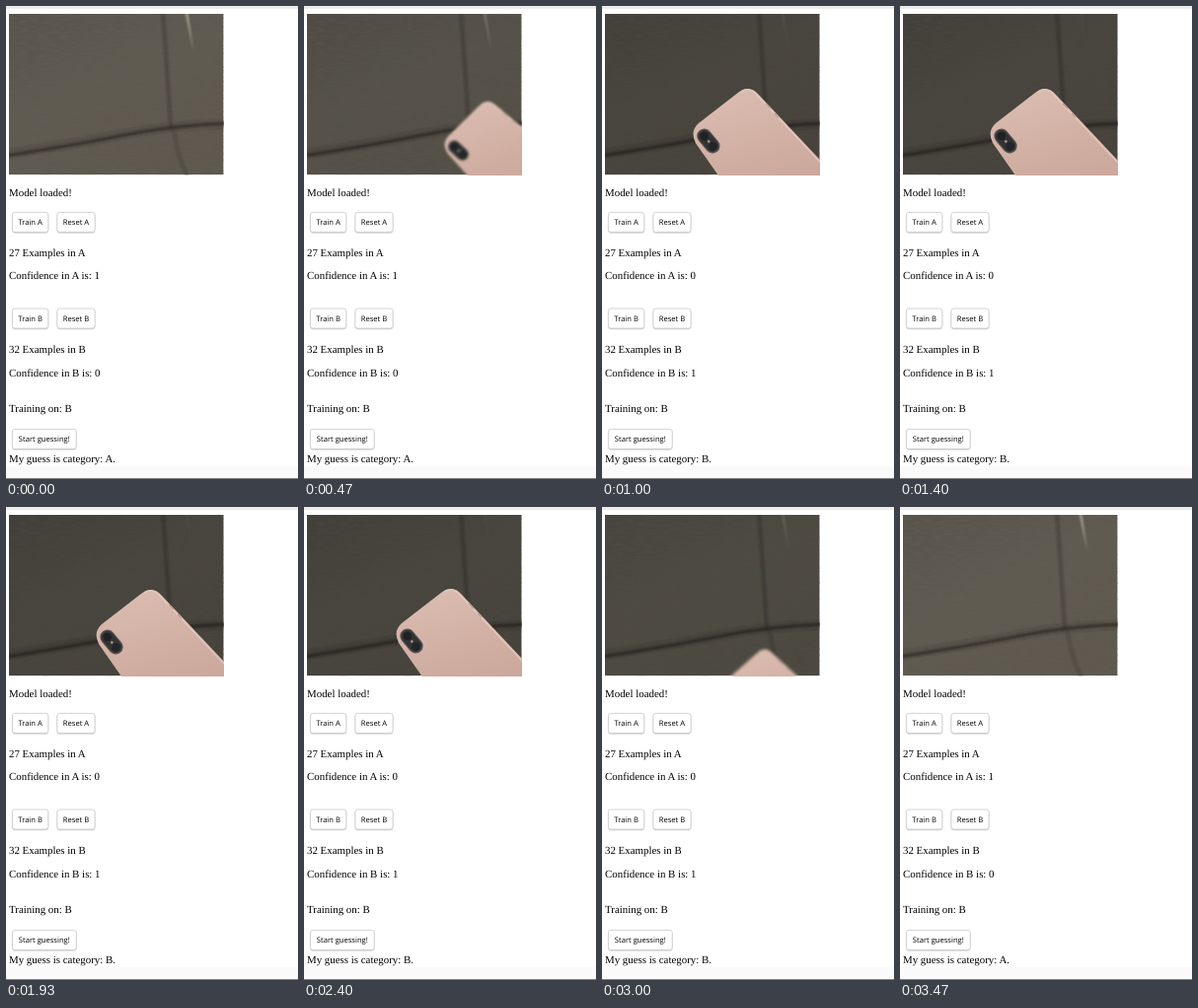
These frames come from a looping animation (296 px wide and 480 px high, 4.07 s). An HTML page:

```html
<!DOCTYPE html>
<html lang="en">
<head>
<meta charset="utf-8">
<title>Webcam classifier</title>
<style>
  html, body { margin: 0; width: 100%; height: 100%; overflow: hidden; background: #fff; }
  #stage { display: block; width: 100vw; height: 100vh; }
  text { font: 10.9px "Liberation Serif", serif; text-rendering: geometricPrecision; }
  .button text { font: 7.6px "Open Sans", sans-serif; text-anchor: middle; }
  .button rect { fill: #fff; stroke: #c9c9c9; stroke-width: .8; }
  .button .shadow { fill: #ccc; stroke: #ddd; }
  .seam { fill: none; stroke: #28241f; stroke-linecap: round; }
</style>
</head>
<body>
<svg id="stage" viewBox="0 0 296 480">
  <defs>
    <linearGradient id="cloth" x2=".6" y2="1">
      <stop offset="0" stop-color="#57534b"/>
      <stop offset=".5" stop-color="#605b51"/>
      <stop offset="1" stop-color="#5e584e"/>
    </linearGradient>
    <linearGradient id="shell" x1=".3" y1="0" x2=".7" y2="1">
      <stop offset="0" stop-color="#dabbb0"/>
      <stop offset=".5" stop-color="#d0ada1"/>
      <stop offset="1" stop-color="#c6a296"/>
    </linearGradient>
    <filter id="weave" x="0" y="0" width="1" height="1">
      <feTurbulence type="fractalNoise" baseFrequency=".09 .6" numOctaves="2" seed="4"/>
      <feColorMatrix values="0 0 0 0 .12  0 0 0 0 .11  0 0 0 0 .09  1.6 0 0 0 -.66"/>
    </filter>
    <filter id="soft" filterUnits="userSpaceOnUse" x="-20" y="-20" width="280" height="230">
      <feGaussianBlur stdDeviation="1.3"/>
    </filter>
  </defs>

  <rect width="296" height="480" fill="#fff"/>
  <rect width="296" height="2" fill="#f1f1f1"/>
  <rect y="1.6" width="296" height=".9" fill="#dcdcdc"/>
  <rect y="467" width="296" height="12" fill="#fafafa"/>
  <rect y="479" width="296" height="1" fill="#858585"/>

  <!-- camera view -->
  <svg x="3" y="8" width="217.6" height="163.2" viewBox="3 8 217.6 163.2">
    <rect x="3" y="8" width="217.6" height="163.2" fill="url(#cloth)"/>
    <rect x="3" y="8" width="217.6" height="163.2" filter="url(#weave)"/>
    <g filter="url(#soft)">
      <path class="seam" stroke-width="9" opacity=".18" d="M0 150Q70 140 120 130T225 120"/>
      <path class="seam" stroke-width="3" opacity=".65" d="M0 152Q70 141 120 131T225 119"/>
      <path class="seam" stroke-width="3.5" opacity=".32" d="M159 5Q163 60 167 123"/>
      <path class="seam" stroke-width="3" opacity=".25" d="M170 126Q173 150 184 174"/>
      <path id="glare" d="M181 4L184 4L190 46Z" fill="#fff4e0"/>
    </g>
    <rect id="dim" x="3" y="8" width="217.6" height="163.2" fill="#050608"/>
    <g id="phone">
      <path fill="url(#shell)" d="M145 212L94 139Q88 127 97 119L137 88Q149 79 158 90L270 209Z"/>
      <path d="M140 87Q149 81 157 91L269 210" fill="none" stroke="#e6cfc5" stroke-width="1.6" opacity=".75"/>
      <path d="M165 99l5 5.300M174 109l4 4.300" stroke="#a98479" stroke-width="1"/>
      <g transform="translate(107 137) rotate(50)">
        <rect x="-14" y="-7.500" width="28" height="15" rx="7.500" fill="#55504e"/>
        <rect x="-12.500" y="-6.200" width="25" height="12.400" rx="6.200" fill="#343334"/>
        <circle cx="-6.500" r="4.300" fill="#202124"/>
        <circle cx="7" r="4.300" fill="#242528"/>
        <circle cx=".5" r="1.300" fill="#a89c94"/>
      </g>
    </g>
  </svg>

  <g id="page"></g>
</svg>
<script>
const FRAME = 1000 / 15, LOOP = 4070;
const $ = id => document.getElementById(id);
const page = $("page");

function line(y, content = "") {
  page.insertAdjacentHTML("beforeend", `<text x="3" y="${y}">${content}</text>`);
  return page.lastElementChild;
}

function button(x, y, width, label) {
  page.insertAdjacentHTML("beforeend", `<g class="button">
    <rect class="shadow" x="${x}" y="${y + 1}" width="${width}" height="20" rx="2.500"/>
    <rect x="${x}" y="${y}" width="${width}" height="20" rx="2.500"/>
    <text x="${x + width / 2}" y="${y + 12.8}">${label}</text></g>`);
}

line(192.5, "Model loaded!");
line(254, "27 Examples in A");
line(351.5, "32 Examples in B");
line(412, "Training on: B");
const confidenceA = line(277), confidenceB = line(375.5), guess = line(463);
button(6.4, 209.4, 36.4, "Train A");
button(51.9, 209.4, 38.2, "Reset A");
button(6.4, 307, 36.4, "Train B");
button(51.9, 307, 38.2, "Reset B");
button(6.4, 429.4, 64.8, "Start guessing!");

// time, x and y of the phone's top edge, scale, rotation, blur
const phoneKeys = [
  [0, 250, 175, .85, -8, 2],
  [130, 235, 160, .85, -8, 2],
  [330, 195, 140, .85, -7, 2],
  [400, 195, 140, .85, -7, 2],
  [467, 164, 117, .86, -7, 1.5],
  [600, 144, 100, .95, -3, 1],
  [733, 134, 95, 1, 0, .8],
  [934, 121, 104, 1, 0, .5],
  [1400, 120, 104, 1, 0, .4],
  [2000, 120, 104, 1, 0, .4],
  [2400, 122, 103, 1, 0, .4],
  [2600, 123, 105, 1, 0, .5],
  [2800, 139, 134, .78, -4, 1.5],
  [2934, 139, 134, .78, -4, 1.5],
  [3067, 150, 190, .78, -4, 2],
  [LOOP, 150, 260, .78, -4, 2]
];
// time, darkness of the view, strength of the light streak
const lightKeys = [
  [0, 0, .45], [400, .02, .4], [467, .1, .25], [733, .24, .1], [1400, .25, .05],
  [2600, .25, .05], [2800, .22, .12], [2934, .22, .12], [3400, 0, .45], [LOOP, 0, .45]
];

function sample(keys, time) {
  const next = Math.max(1, keys.findIndex(key => key[0] > time));
  const from = keys[next - 1], to = keys[next];
  const mix = (time - from[0]) / (to[0] - from[0]);
  return from.map((value, i) => value + (to[i] - value) * mix).slice(1);
}

function draw(now) {
  const time = Math.floor((now % LOOP + 5) / FRAME) * FRAME % LOOP;
  const [x, y, scale, turn, blur] = sample(phoneKeys, time);
  const [dark, glare] = sample(lightKeys, time);
  $("phone").setAttribute("transform",
    `translate(${x} ${y}) rotate(${turn}) scale(${scale}) translate(-120 -104)`);
  $("phone").style.filter = `blur(${blur}px)`;
  $("dim").setAttribute("opacity", dark);
  $("glare").setAttribute("opacity", glare);

  const seesPhone = time > 860 && time < 3190;
  confidenceA.textContent = `Confidence in A is: ${seesPhone ? 0 : 1}`;
  confidenceB.textContent = `Confidence in B is: ${seesPhone ? 1 : 0}`;
  guess.textContent = `My guess is category: ${seesPhone ? "B" : "A"}.`;
}

const start = performance.now();
function tick() {
  draw(performance.now() - start);
  requestAnimationFrame(tick);
}
tick();
</script>
</body>
</html>
```
